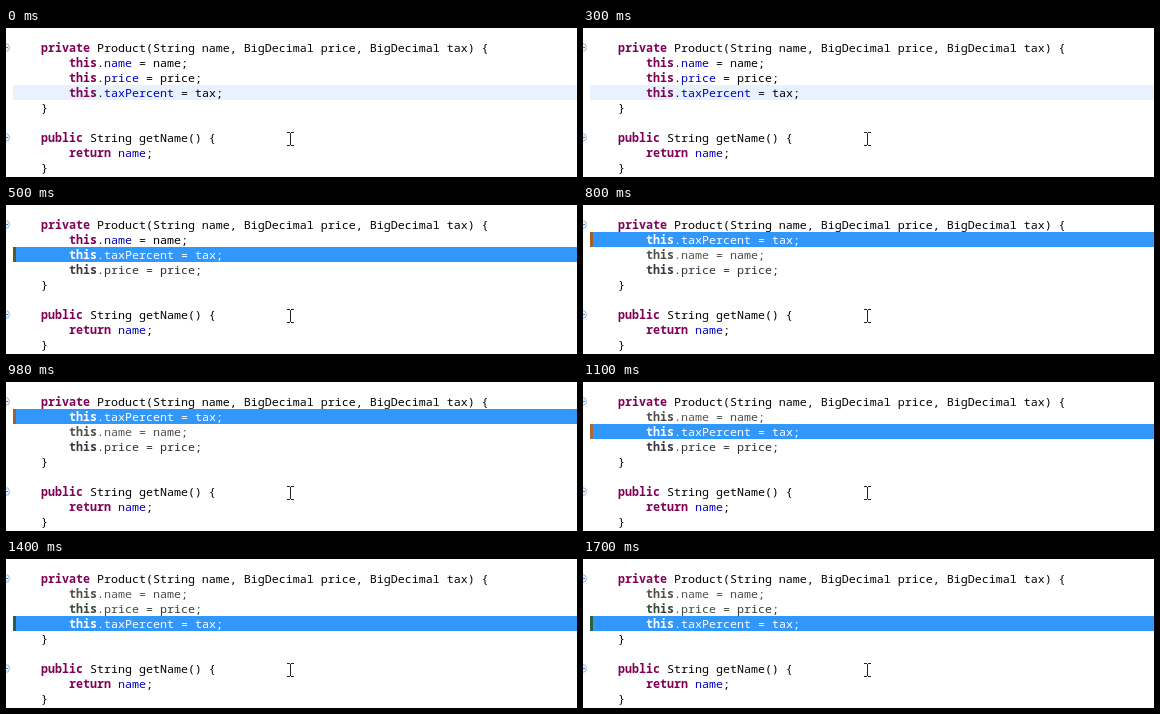
These frames come from a looping animation (571x149 px, 1.9 s). An HTML page:

```html
<!DOCTYPE html>
<html lang="en">
<head>
<meta charset="utf-8">
<title>Moving a line of code</title>
<style>
html, body { margin: 0; width: 100%; height: 100%; overflow: hidden; background: #fff; }
svg { display: block; width: 571px; height: 149px; }
text { font: 11.667px "Noto Sans Mono", "DejaVu Sans Mono", monospace; white-space: pre; }
.key { font-weight: bold; }
</style>
</head>
<body>
<svg id="stage" viewBox="0 0 571 149" xmlns="http://www.w3.org/2000/svg">
  <rect width="571" height="149" fill="#fff"/>
  <rect id="bar" x="7" width="564" height="15"/>
  <rect id="mark" x="7" width="3" height="15"/>
  <g id="code"></g>
  <g id="folds"></g>
  <path d="M281 104.5h3m1 0h3M284.5 105v12M281 117.5h3m1 0h3" fill="none" stroke="#222" stroke-width="1"/>
</svg>
<script>
const NS = "http://www.w3.org/2000/svg";
const $ = id => document.getElementById(id);
const LINE = 15, TOP = 12, LEFT = 7, CHAR = 7;

// Each style gives the colours of keyword, field and plain text.
const styles = {
  normal: ["#7f0055", "#0000c0", "#000"],
  dark: ["#3f3540", "#30303c", "#2c2c2c"],
  grey: ["#50504a", "#555550", "#484844"],
  green: ["#344a34", "#3c4c3c", "#303c30"],
  selected: ["#fff", "#fff", "#fff"]
};

function make(tag, attrs, parent) {
  const el = document.createElementNS(NS, tag);
  for (const k in attrs) el.setAttribute(k, attrs[k]);
  return parent.appendChild(el);
}

// Keywords are written as *word*, fields as _word_.
function addLine(source, row, indent) {
  const text = make("text", { x: LEFT + indent * CHAR }, $("code"));
  for (const part of source.split(/(\*\w+\*|_\w+_)/)) {
    if (!part) continue;
    const kind = part[0] === "*" ? 0 : part[0] === "_" ? 1 : 2;
    const span = make("tspan", kind ? {} : { class: "key" }, text);
    span.textContent = kind < 2 ? part.slice(1, -1) : part;
    span.kind = kind;
  }
  place(text, row, "normal");
  return text;
}

function place(text, row, style) {
  text.setAttribute("y", TOP + row * LINE + 12);
  for (const span of text.children) span.setAttribute("fill", styles[style][span.kind]);
}

addLine("*private* Product(String name, BigDecimal price, BigDecimal tax) {", 0, 4);
addLine("}", 4, 4);
addLine("*public* String getName() {", 6, 4);
addLine("*return* _name_;", 7, 8);
addLine("}", 8, 4);
const name = addLine("*this*._name_ = name;", 1, 8);
const price = addLine("*this*._price_ = price;", 2, 8);
const tax = addLine("*this*._taxPercent_ = tax;", 3, 8);

for (const y of [19.5, 109.5]) {
  make("circle", { cx: -0.5, cy: y, r: 4, fill: "#eef5fc", stroke: "#9dbbdc" }, $("folds"));
  make("path", { d: `M0 ${y}h2`, stroke: "#4f7fb5" }, $("folds"));
}

const steps = [
  { end: 500, name: [1, "normal"], price: [2, "normal"], tax: [3, "normal"] },
  { end: 800, name: [1, "normal"], price: [3, "dark"], tax: [2, "selected"], mark: "#5c5a1c" },
  { end: 1100, name: [2, "grey"], price: [3, "dark"], tax: [1, "selected"], mark: "#a0622c" },
  { end: 1400, name: [1, "grey"], price: [3, "dark"], tax: [2, "selected"], mark: "#a8683c" },
  { end: 1900, name: [1, "grey"], price: [2, "green"], tax: [3, "selected"], mark: "#2c6040" }
];

function draw(ms) {
  const step = steps.find(s => ms % 1900 < s.end);
  const y = TOP + step.tax[0] * LINE;
  place(name, ...step.name);
  place(price, ...step.price);
  place(tax, ...step.tax);
  $("bar").setAttribute("y", y);
  $("bar").setAttribute("fill", step.mark ? "#3297fa" : "#e8f2fe");
  $("mark").setAttribute("y", y);
  $("mark").setAttribute("fill", step.mark || "none");
}

const start = performance.now();
function tick() {
  draw(performance.now() - start);
  requestAnimationFrame(tick);
}
tick();
</script>
</body>
</html>
```
